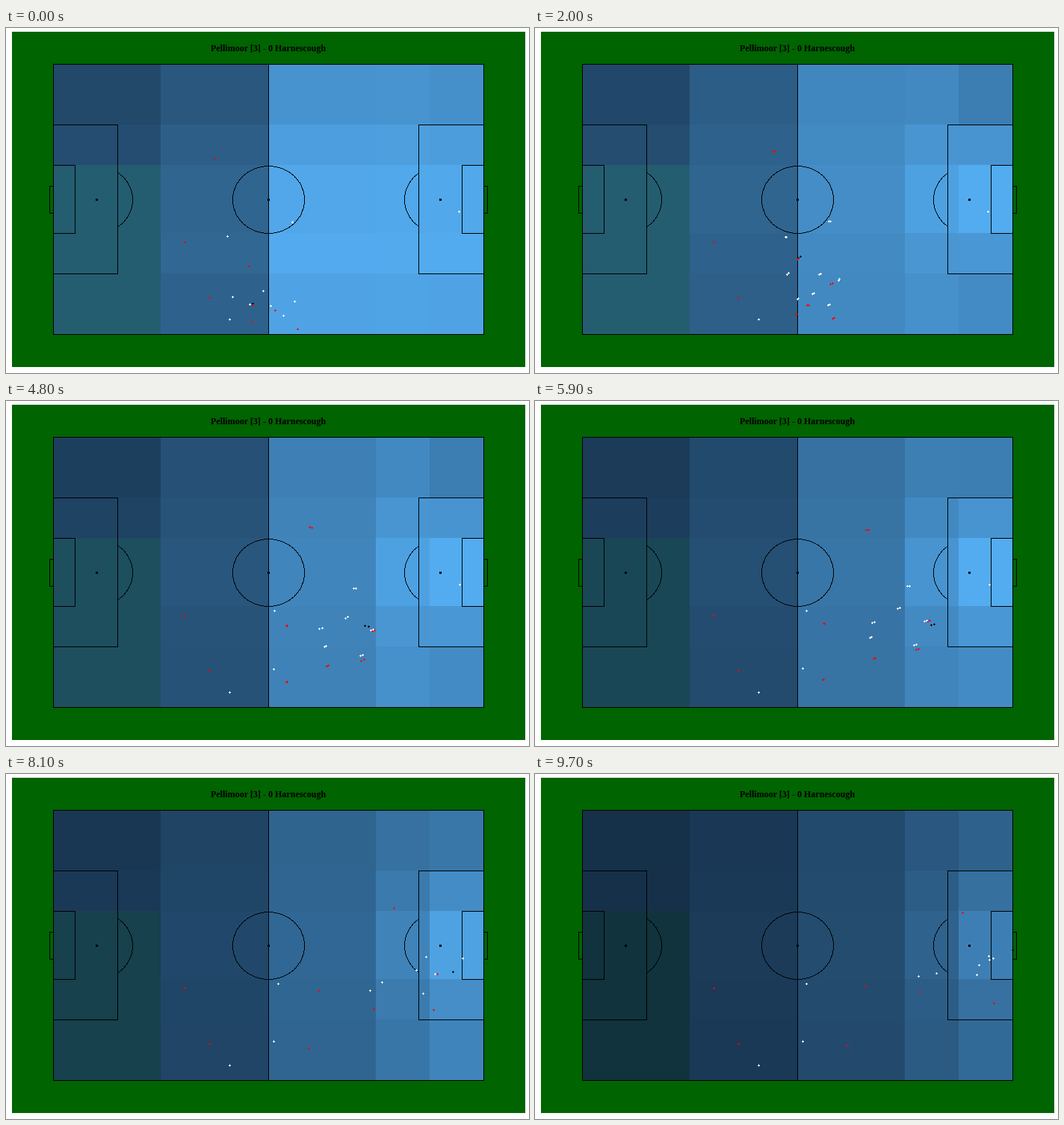
Animation, 700 px wide and 461 px high, one loop 10 s. Source, as a matplotlib script:

```python
import matplotlib.pyplot as plt
import numpy as np
from matplotlib.animation import FuncAnimation
from matplotlib.collections import PolyCollection
from matplotlib.patches import Rectangle

W, H, DPI = 700, 461, 64
PX = 72 / DPI
STEPS, LAST = 100, 97

XS = [63, 207, 351, 495, 567, 639]
YS = [48, 129, 183, 274, 328, 409]
DARK, LIGHT = np.array([19, 43, 67]) / 255, np.array([86, 177, 247]) / 255
TEAL_LO, TEAL_HI = np.array([8, 36, 42]) / 255, np.array([36, 93, 112]) / 255

# Pitch value falls with time; crossing halfway changes the pattern
FADE = [(0, 1.03), (1.9, 1.03), (4.8, 0.75), (5.9, 0.62),
        (8.1, 0.5), (8.4, 0.48), (8.5, 0.41), (9.7, 0.27)]
CROSSING = 1.9
OFFSET = np.array([-3, 0, 0, 13, 32])
GAIN = np.array([24, 43, 90, 105, 113])
# Per half: column ceilings, column and row shares of the loss off centre
BEFORE = [22, 43, 93, 93, 93], [0, 0.24, 0.16, 0.16, 0.19], [1, 0.45, 0, -0.15, 0.2]
AFTER = [22, 43, 73, 88, 96], [0, 0.14, 0.06, 0.2, 0.36], [1, 0.5, 0, 0.45, 0.7]

# Way points (x, y) at the key times
KEYS = np.array([0, 1.8, 5.9, 9.7])
WHITES = [
    [(606, 245), (606, 245), (608, 245), (613, 246)],
    [(296, 278), (333, 279), (363, 280), (363, 280)],
    [(383, 259), (392, 258), (501, 247), (607, 243)],
    [(303, 359), (335, 330), (454, 295), (537, 266)],
    [(344, 351), (378, 330), (488, 276), (594, 255)],
    [(386, 365), (404, 338), (524, 293), (608, 248)],
    [(354, 371), (370, 356), (450, 315), (513, 270)],
    [(326, 369), (350, 362), (358, 357), (358, 357)],
    [(371, 384), (390, 371), (510, 325), (591, 268)],
    [(299, 389)] * 4,
]
REDS = [
    [(279, 175), (316, 165), (446, 172), (572, 185)],
    [(325, 318), (350, 309), (387, 297), (442, 283)],
    [(390, 402), (397, 389), (513, 331), (614, 306)],
    [(360, 377), (393, 344), (528, 293), (608, 248)],
    [(330, 370), (362, 370), (455, 343), (516, 291)],
    [(329, 392), (348, 383), (386, 372), (418, 362)],
    [(239, 286)] * 4,
    [(272, 360)] * 4,
]
BALL = [(330, 368), (350, 309), (534, 298), (639, 235)]
TRAIL = 2.0, 8.0

PATHS = np.array([BALL] + REDS + WHITES, float)
SLOPES = np.gradient(PATHS, KEYS, axis=1)
COLORS = ["black"] + ["red"] * len(REDS) + ["white"] * len(WHITES)
PLUS = np.array([(0, -1), (1, -1), (1, 0), (2, 0), (2, 1), (1, 1),
                 (1, 2), (0, 2), (0, 1), (-1, 1), (-1, 0), (0, 0)])


def positions(t):
    """Cubic Hermite position of every dot, in whole pixels."""
    i = min(np.searchsorted(KEYS, t, side="right"), len(KEYS) - 1) - 1
    h = KEYS[i + 1] - KEYS[i]
    u = (t - KEYS[i]) / h
    ease = u * u * (3 - 2 * u)
    bend = u * (1 - u) * h * ((1 - u) * SLOPES[:, i] - u * SLOPES[:, i + 1])
    return np.rint(PATHS[:, i] * (1 - ease) + PATHS[:, i + 1] * ease + bend)


def pitch_colors(t):
    """5 x 5 grid of cell colours."""
    fade = np.interp(t, *zip(*FADE))
    cap, side, rows = BEFORE if t < CROSSING else AFTER
    value = np.minimum(cap, OFFSET + GAIN * fade) * (1 - np.outer(rows, side))
    value[1, 0] *= 1.17
    grid = DARK + (LIGHT - DARK) * value[..., None] / 100
    grid[2:, 0] = TEAL_LO + (TEAL_HI - TEAL_LO) * min(fade, 1)
    return grid


fig = plt.figure(figsize=(W / DPI, H / DPI), dpi=DPI, facecolor="white")
ax = fig.add_axes([0, 0, 1, 1])
ax.set(xlim=(0, W), ylim=(H, 0))
ax.axis("off")


def fill(x0, y0, x1, y1, color="black", z=3):
    return ax.add_patch(Rectangle((x0, y0), x1 - x0, y1 - y0, fc=color, lw=0,
                                  antialiased=False, zorder=z))


def hline(x0, x1, y):
    fill(min(x0, x1), y, max(x0, x1) + 1, y + 1)


def vline(x, y0, y1):
    fill(x, y0, x + 1, y1 + 1)


def arc(x, start=-np.pi, end=np.pi):
    """One pixel wide arc of the 10 yard circle."""
    a = np.linspace(start, end, int(46 * (end - start)))
    spots = np.rint(np.c_[x + 48 * np.cos(a), 229 + 45 * np.sin(a)])
    square = np.array([(0, 0), (1, 0), (1, 1), (0, 1)])
    ax.add_collection(PolyCollection([square + p for p in spots], facecolors="black",
                                     linewidths=0, antialiaseds=False, zorder=3),
                      autolim=False)


fill(8, 5, 695, 453, "#006400", 1)
cells = [[fill(XS[c], YS[r], XS[c + 1], YS[r + 1], z=2) for c in range(5)]
         for r in range(5)]

for y in (48, 409):
    hline(63, 639, y)
for x in (63, 351, 639):
    vline(x, 48, 409)
for goal, edges in ((63, (149, 92, 58)), (639, (552, 610, 644))):
    for x, top, bottom in zip(edges, (129, 183, 211), (328, 274, 247)):
        vline(x, top, bottom)
        hline(goal, x, top)
        hline(goal, x, bottom)

edge = np.arccos(0.6)
arc(351)
arc(121, -edge, edge)
arc(581, np.pi - edge, np.pi + edge)
for x in (121, 351, 581):
    fill(x - 1, 228, x + 2, 231)

ax.text(351, 31.5, "Pellimoor [3] - 0 Harnescough", ha="center", va="baseline",
        family="Liberation Serif", weight="bold", size=12 * PX, zorder=3)

dots = ax.add_collection(PolyCollection([], linewidths=0, antialiaseds=False, zorder=4),
                         autolim=False)
dots.set_facecolor(np.repeat(COLORS, 2))


def update(n):
    t = min(n, LAST) / 10
    grid = pitch_colors(t)
    for r, row in enumerate(cells):
        for c, cell in enumerate(row):
            cell.set_facecolor(grid[r, c])

    now = positions(t)
    before = positions(t - 0.1) if TRAIL[0] <= t < TRAIL[1] else now
    pairs = np.stack([before, now], axis=1).reshape(-1, 2)
    dots.set_verts([PLUS + p for p in pairs])
    return [cell for row in cells for cell in row] + [dots]


anim = FuncAnimation(fig, update, frames=STEPS, interval=100, repeat=True,
                     repeat_delay=0, blit=False)
plt.show()
```
